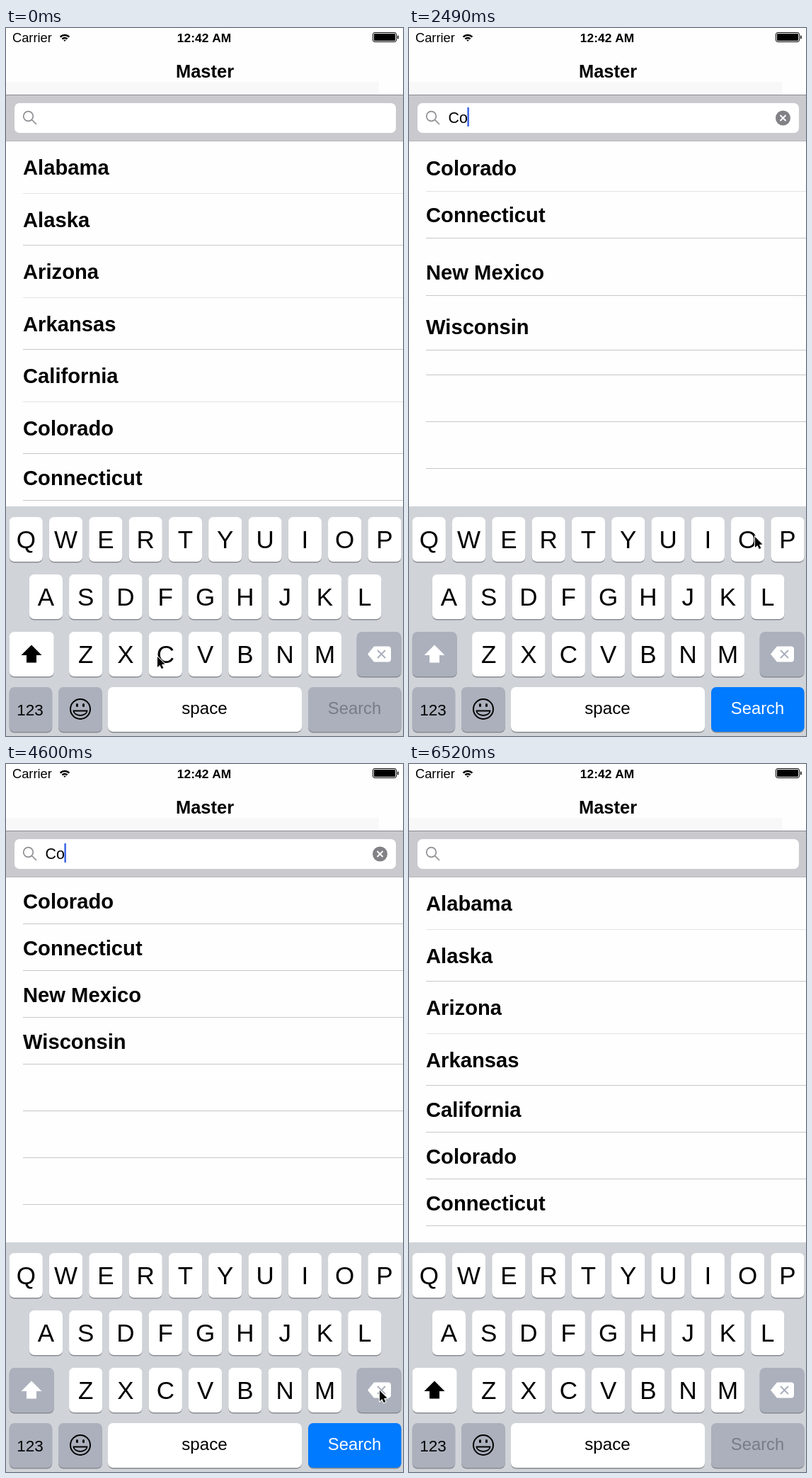
Write an HTML page with a canvas that moves like this. It is 561x999 px and loops after 6900 ms.

```html
<!DOCTYPE html>
<html lang="en">
<head>
<meta charset="utf-8">
<title>Live search list</title>
<style>
html, body { margin: 0; width: 100%; height: 100%; overflow: hidden; background: #fefefe; }
canvas { display: block; }
</style>
</head>
<body>
<canvas id="stage" width="561" height="999"></canvas>
<script>
const c = document.getElementById('stage').getContext('2d');
const W = 561, H = 999, LOOP = 6900;
const TOP = 160, COMPACT = 66, TALL = 73.5, LAG = 15, SLIDE = 280;
const KEY_W = 47.2, KEY_H = 63, PITCH_X = 56.3, PITCH_Y = 81, KEYS_TOP = 690;
const SANS = '"Liberation Sans", Arial, sans-serif';
const PAPER = '#fefefe', LINE = '#c8c7cc', GREY_KEY = '#abb0bc', BLUE = '#007aff';

const STATES = `Alabama,Alaska,Arizona,Arkansas,California,Colorado,Connecticut,Delaware,Florida,Georgia,
Hawaii,Idaho,Illinois,Indiana,Iowa,Kansas,Kentucky,Louisiana,Maine,Maryland,Massachusetts,Michigan,Minnesota,
Mississippi,Missouri,Montana,Nebraska,Nevada,New Hampshire,New Jersey,New Mexico,New York,North Carolina,
North Dakota,Ohio,Oklahoma,Oregon,Pennsylvania,Rhode Island,South Carolina,South Dakota,Tennessee,Texas,Utah,
Vermont,Virginia,Washington,West Virginia,Wisconsin,Wyoming`.split(/,\s*/);

// Key strokes: the text changes on release; `compact` picks the lower rows of the new list
const EDITS = [
  { text: '', down: 5735 - LOOP, up: 6055 - LOOP, compact: /^Conn/ },
  { text: 'C', key: 'C', down: 1060, up: 1200, compact: /^C/ },
  { text: 'Co', key: 'O', down: 2140, up: 2241, compact: /./ },
  { text: 'Col', key: 'L', down: 3050, up: 3165, compact: /./ },
  { text: 'Co', key: 'del', down: 4230, up: 4300, compact: /./ },
  { text: 'C', key: 'del', down: 5035, up: 5105, compact: /^Co|Mex|Wis/ },
  { text: '', key: 'del', down: 5735, up: 6055, compact: /^C/ }
];
for (const edit of EDITS) {
  edit.end = TOP;
  edit.rows = {};
  for (const name of STATES) {
    if (!name.toLowerCase().includes(edit.text.toLowerCase())) continue;
    const h = edit.compact.test(name) ? COMPACT : TALL;
    edit.rows[name] = { y: edit.end, h };
    edit.end += h;
  }
}

// Pointer moves after its rest on C
const MOVES = [
  { from: 1540, to: 1830, x: 472, y: 724 },
  { from: 1900, to: 2490, x: 489, y: 718 },
  { from: 2500, to: 2980, x: 500, y: 793 },
  { from: 3670, to: 3867, x: 528, y: 884 }
];

const SHIFT = new Path2D('M0-13.5 14.5 1H7V11.5H-7V1H-14.5Z');
const ERASE = new Path2D('M-16 0-7-11H13Q17-11 17-7V7Q17 11 13 11H-7Z');
const ARROW = new Path2D('M0 0V15L3.4 12 5.8 17 8.4 16 6 11 10.5 10.6Z');

const mix = (a, b, p) => a + (b - a) * p;
const clamp = p => Math.max(0, Math.min(1, p));
const ease = p => p * p * (3 - 2 * p);

function rect(x, y, w, h, fill, r = 0) {
  c.fillStyle = fill;
  c.beginPath();
  c.roundRect(x, y, w, h, r);
  c.fill();
}

function stroke(color, width, draw) {
  c.strokeStyle = color;
  c.lineWidth = width;
  c.beginPath();
  draw();
  c.stroke();
}

function icon(path, x, y, fill, outline) {
  c.save();
  c.translate(x, y);
  if (outline) {
    c.strokeStyle = outline;
    c.lineWidth = 2;
    c.stroke(path);
  }
  c.fillStyle = fill;
  c.fill(path);
  c.restore();
}

function cross(x, y, r, color) {
  stroke(color, 2, () => {
    for (const s of [-1, 1]) {
      c.moveTo(x - r, y - s * r);
      c.lineTo(x + r, y + s * r);
    }
  });
}

function text(s, x, y, font, color = '#000', align = 'center') {
  c.font = `${font}, ${SANS}`.replace('px,', 'px');
  c.fillStyle = color;
  c.textAlign = align;
  c.fillText(s, x, y);
}

function row(name, x, y, h, alpha = 1) {
  if (y > 680) return;
  c.save();
  c.globalAlpha = alpha;
  c.translate(x, 0);
  rect(0, y, W, h, PAPER);
  rect(24, Math.round(y + h) - 1, W - 24, 1, LINE);
  text(name, 24, y + h / 2 + 10.5, 'bold 29.2px', '#000', 'left');
  c.restore();
}

// Lost rows leave to the right, new ones enter from the left, kept ones slide above both
function list(t) {
  const i = EDITS.findLastIndex(e => t >= e.up + LAG);
  const to = EDITS[i], from = EDITS[Math.max(0, i - 1)];
  const p = ease(clamp((t - to.up - LAG) / SLIDE));
  for (let y = TOP + COMPACT; y < 680; y += COMPACT)
    if (y > to.end) rect(24, y - 1, W - 24, 1, LINE);

  const kept = [];
  let fromEnd = TOP, toEnd = TOP;
  for (const name of STATES) {
    const a = from.rows[name], b = to.rows[name];
    if (a && b) {
      kept.push([name, 0, mix(a.y, b.y, p), b.h]);
      fromEnd = a.y + a.h;
      toEnd = b.y + b.h;
    } else if (a && p < 1) {
      row(name, W * p, mix(a.y, toEnd, p), a.h, 1 - p);
    } else if (b) {
      row(name, -W * (1 - p), mix(fromEnd, b.y, p), b.h, p);
    }
  }
  kept.forEach(k => row(...k));
}

// Solid after a key stroke, then fades out and back in
function caretAlpha(t) {
  const age = (t - EDITS.findLast(e => t >= e.down).down) % 1545;
  return Math.max(clamp((785 - age) / 85), clamp((age - 1460) / 85));
}

function header(query, t) {
  rect(0, 0, W, 94, PAPER);
  rect(0, 76, 527, 18, '#f8f8f8');
  text('Carrier', 9, 20, '18.3px', '#000', 'left');
  text('12:42 AM', 280, 20, 'bold 17.4px');
  for (let r = 1; r < 13; r += 4)
    stroke('#000', 2.6, () => c.arc(83, 19, r, -Math.PI * 0.75, -Math.PI * 0.25));
  stroke('#000', 1, () => c.roundRect(518.5, 6.5, 33, 13, 2.5));
  rect(520, 8, 30, 10, '#000', 1);
  rect(553, 10.5, 1.6, 5, '#000', 1);
  text('Master', 281, 70, 'bold 25.5px');

  rect(0, 94, W, 66, '#c9c9ce');
  rect(0, 94, W, 1, '#8b8b90');
  rect(0, 159, W, 1, '#b6b6bb');
  rect(12, 106, 539, 42, '#fff', 7);
  stroke('#8e8e93', 1.7, () => {
    c.arc(31.5, 124.5, 6.8, Math.PI / 4, Math.PI * 2.25);
    c.lineTo(43, 136);
  });
  text(query, 55.5, 134, '21.4px', '#000', 'left');
  const x = (query ? 55 : 54) + c.measureText(query).width;
  c.globalAlpha = caretAlpha(t);
  rect(x, 112, 2.6, 27, '#4069e4');
  c.globalAlpha = 1;
  if (query) {
    rect(518, 116.5, 21, 21, '#818186', 10.5);
    cross(528.5, 127, 4, '#fff');
  }
}

function key(x, y, w, fill = '#fff') {
  rect(x, y + 1.6, w, KEY_H, '#888c91', 7);
  rect(x, y, w, KEY_H, fill, 7);
}

function balloon(letter, x, y) {
  const l = x - 20, r = x + KEY_W + 20, neck = y - 27;
  c.save();
  c.shadowColor = 'rgba(0,0,0,.35)';
  c.shadowBlur = 7;
  c.fillStyle = '#fff';
  c.beginPath();
  c.roundRect(l, y - 98, r - l, 72, [13, 13, 0, 0]);
  c.moveTo(l, neck);
  c.lineTo(r, neck);
  c.bezierCurveTo(r, y - 8, x + KEY_W, y - 14, x + KEY_W, y + 8);
  c.lineTo(x, y + 8);
  c.bezierCurveTo(x, y - 14, l, y - 8, l, neck);
  c.roundRect(x, y + 7, KEY_W, KEY_H - 7, [0, 0, 7, 7]);
  c.fill();
  c.restore();
  text(letter, x + KEY_W / 2, y - 33, '300 65px Inter');
}

function keyboard(query, pressed) {
  rect(0, 675, W, H - 675, '#d0d4d9');
  let popup;
  ['QWERTYUIOP', 'ASDFGHJKL', 'ZXCVBNM'].forEach((letters, line) => {
    const y = KEYS_TOP + line * PITCH_Y;
    const left = 281.6 - (letters.length * PITCH_X - (PITCH_X - KEY_W)) / 2;
    [...letters].forEach((letter, i) => {
      const x = left + PITCH_X * i;
      key(x, y, KEY_W);
      text(letter, x + KEY_W / 2, y + 44, '35px');
      if (letter === pressed) popup = [letter, x, y];
    });
  });

  const y3 = KEYS_TOP + 2 * PITCH_Y, y4 = y3 + 78;
  key(4.7, y3, 63, query ? GREY_KEY : '#fff');
  icon(SHIFT, 36, 884, query ? '#fff' : '#000');
  const erasing = pressed === 'del';
  key(495.7, y3, 62.8, erasing ? '#fff' : GREY_KEY);
  icon(ERASE, 527, 883.5, erasing ? '#000' : '#fff');
  cross(530.5, 883.5, 5.5, erasing ? '#fff' : GREY_KEY);

  key(4.7, y4, 60.5, GREY_KEY);
  text('123', 34, 969.5, '22.5px');
  key(74, y4, 61.8, GREY_KEY);
  stroke('#000', 2, () => c.arc(105, 961, 14, 0, Math.PI * 2));
  for (const side of [-1, 1]) rect(103.5 + side * 4.5, 953, 3, 5, '#000', 1.5);
  stroke('#000', 1.8, () => {
    c.ellipse(105, 963.5, 9.5, 6.5, 0, 0, Math.PI);
    c.closePath();
  });
  key(144, y4, 274);
  text('space', 280.5, 968, '24.2px');
  key(427, y4, 131.5, query ? BLUE : GREY_KEY);
  text('Search', 492.5, 968, '23.8px', query ? '#fff' : '#777c87');
  if (popup) balloon(...popup);
}

function pointer(t) {
  let x = 214, y = 887;
  for (const m of MOVES) {
    const p = ease(clamp((t - m.from) / (m.to - m.from)));
    x = mix(x, m.x, p);
    y = mix(y, m.y, p);
  }
  icon(ARROW, x, y, '#000', '#fff');
}

function draw() {
  const t = performance.now() % LOOP;
  const query = EDITS.findLast(e => t >= e.up).text;
  const press = EDITS.find(e => t >= e.down && t < e.up);
  rect(0, 0, W, H, PAPER);
  list(t);
  header(query, t);
  keyboard(query, press && press.key);
  if (t < 6515) pointer(t);
  requestAnimationFrame(draw);
}
draw();
</script>
</body>
</html>
```
